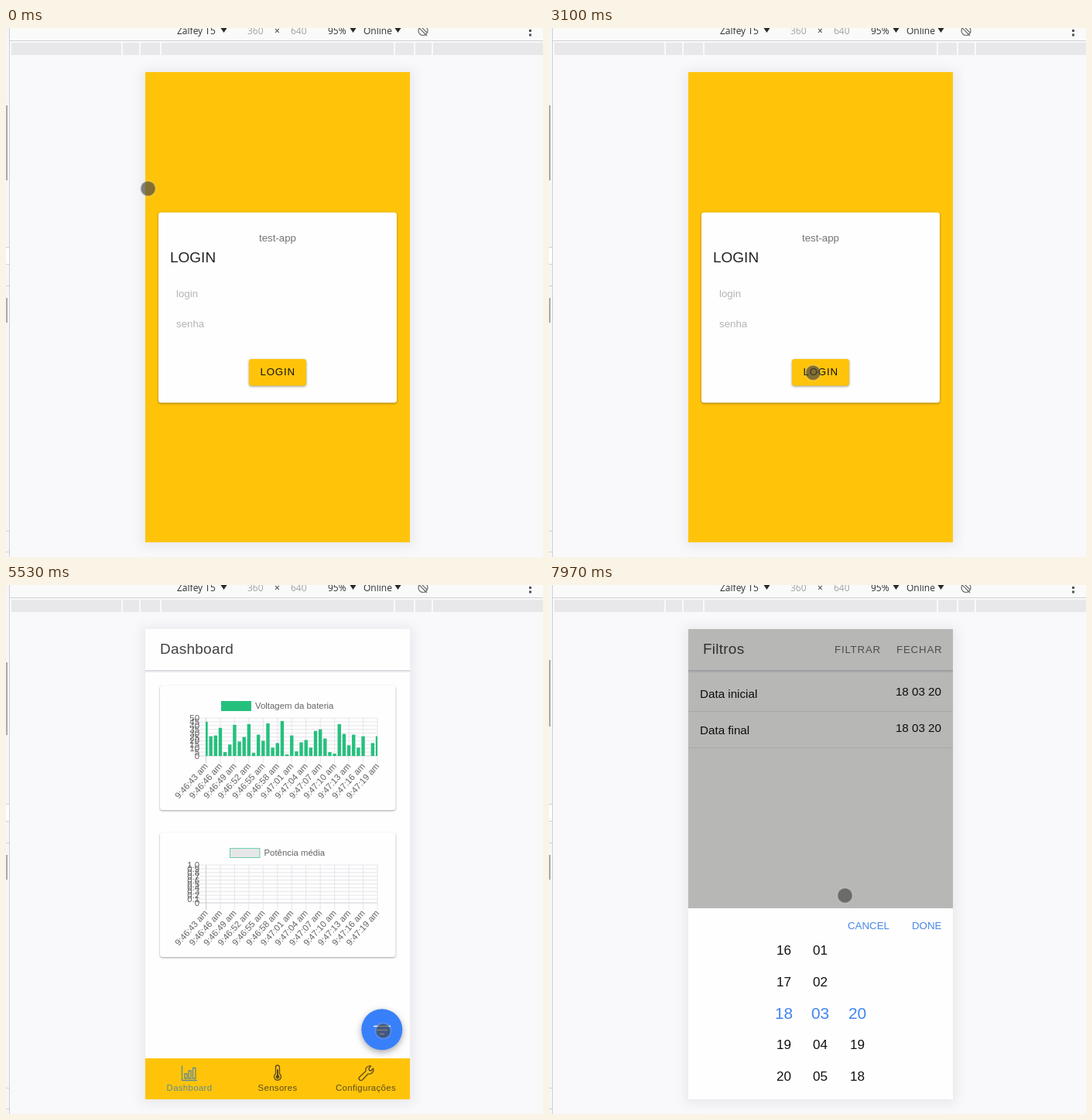
An HTML page for the animation above (8000 ms loop, 694x684 px).

```html
<!DOCTYPE html>
<html lang="pt">
<head>
<meta charset="utf-8">
<title>App demo</title>
<style>
html, body { margin: 0; width: 100%; height: 100%; overflow: hidden; background: #f9f9fb; }
svg { display: block; width: 100vw; height: 100vh; }
text { font-family: "Liberation Sans", Arial, sans-serif; white-space: pre; }
.bar text { font: 12px "Open Sans", "Noto Sans", sans-serif; fill: #303030; }
.bar .dim { fill: #a2a2a2; }
.title { font-size: 19px; letter-spacing: .24px; fill: #424242; }
.small { font-size: 13.3px; }
.caps { font-size: 13.3px; letter-spacing: .8px; }
.row { font-size: 15.2px; fill: #121212; }
.tick, .legend { font-size: 11.4px; fill: #636363; }
.tab { font-size: 11.4px; letter-spacing: .35px; text-anchor: middle; }
.mid { text-anchor: middle; }
.end { text-anchor: end; }
.icon { fill: none; stroke-width: 1.3; stroke-linejoin: round; stroke-linecap: round; }

.login-card { filter: drop-shadow(0 1.5px 1.5px rgba(60, 50, 20, .5)); }
.card { fill: #fefefe; filter: drop-shadow(0 1.2px 1.2px rgba(70, 70, 75, .5)); }
.fab { filter: drop-shadow(0 3px 4px rgba(60, 60, 70, .45)); }
.glow { filter: blur(7px); }

.anim { animation: 8s linear infinite; }
#home { animation-name: home; }
#bars { animation-name: grow; transform-origin: 0 221px; }
#shade { animation-name: shade; }
#modal { animation-name: rise, appear; }
#ripple { animation-name: ripple; transform-origin: 380px 144px; }
#dim { animation-name: dim; }
#picker { animation-name: picker; }
#cursor { animation-name: travel; }
#dot { animation-name: dot; animation-timing-function: step-end; }
#arrow { animation-name: arrow; animation-timing-function: step-end; }
#thumb { animation-name: thumb; animation-timing-function: step-end; }

@keyframes home {
  0%, 43.81% { opacity: 0; transform: translateY(38px); animation-timing-function: cubic-bezier(.36,.66,.04,1); }
  47.31%, 100% { opacity: 1; transform: none; }
}
@keyframes grow {
  0%, 41.81% { transform: scaleY(0); animation-timing-function: cubic-bezier(.165,.84,.44,1); }
  54.31%, 100% { transform: scaleY(1); }
}
@keyframes shade {
  0%, 73.8% { opacity: 0; }
  77.3%, 100% { opacity: .32; }
}
@keyframes rise {
  0%, 73.8% { transform: translateY(38px); animation-timing-function: cubic-bezier(.36,.66,.04,1); }
  77.3%, 100% { transform: none; }
}
@keyframes appear {
  0%, 73.8% { opacity: 0; animation-timing-function: ease-out; }
  75.7%, 100% { opacity: 1; }
}
@keyframes ripple {
  0%, 92.8% { opacity: 0; transform: scale(.1); animation-timing-function: ease-out; }
  93.2% { opacity: 1; transform: scale(.3); animation-timing-function: ease-out; }
  94.6%, 95.4% { opacity: 1; transform: scale(1); }
  97.4%, 100% { opacity: 0; transform: scale(1); }
}
@keyframes dim {
  0%, 95.6% { opacity: 0; }
  98.1%, 100% { opacity: .28; }
}
@keyframes picker {
  0%, 95.6% { transform: translateY(250px); animation-timing-function: cubic-bezier(.36,.66,.04,1); }
  98.1%, 100% { transform: none; }
}
@keyframes travel {
  0% { transform: translate(183.5px, 207.5px); }
  10.375%, 10.875% { transform: translate(186px, 281px); }
  15% { transform: translate(260px, 340px); }
  20.875% { transform: translate(335px, 440px); }
  23.125% { transform: translate(283px, 405px); }
  25% { transform: translate(313.5px, 357.5px); }
  26.875% { transform: translate(390px, 322px); }
  28.75% { transform: translate(467px, 420px); }
  30% { transform: translate(410px, 526px); }
  31.25% { transform: translate(358px, 501px); }
  33.125% { transform: translate(319px, 470px); }
  35.375%, 38.75% { transform: translate(342px, 446px); }
  41.875% { transform: translate(150px, 370px); }
  44.5%, 46.25% { transform: translate(128.5px, 332.5px); }
  48.75% { transform: translate(190px, 380px); }
  54.125% { transform: translate(308.5px, 459.5px); }
  56.875% { transform: translate(420px, 520px); }
  59.125%, 59.625% { transform: translate(488px, 566px); }
  61.25%, 64.125% { transform: translate(283px, 379px); }
  65.375% { transform: translate(211px, 326px); }
  67.875% { transform: translate(498px, 598px); }
  69.125%, 78.125% { transform: translate(487.5px, 576.5px); }
  81.25% { transform: translate(500px, 533px); }
  83.125% { transform: translate(269px, 340px); }
  85.375%, 95% { transform: translate(380.5px, 144.5px); }
  99.6%, 100% { transform: translate(382.5px, 401.5px); }
}
@keyframes dot { 0% { opacity: 1; } 41.4% { opacity: 0; } 48.3%, 100% { opacity: 1; } }
@keyframes arrow { 0% { opacity: 0; } 41.4% { opacity: 1; } 48.3%, 100% { opacity: 0; } }
@keyframes thumb {
  0% { height: 97px; transform: none; }
  40% { height: 94px; transform: none; }
  72% { height: 88px; transform: none; }
  98%, 100% { height: 86px; transform: translateY(-3px); }
}
</style>
</head>
<body>
<svg viewBox="0 0 694 684" preserveAspectRatio="xMinYMin meet">
  <defs>
    <clipPath id="screen"><rect x="180" y="57" width="342" height="608"/></clipPath>
    <clipPath id="plot"><rect x="258.5" y="165" width="221.5" height="56"/></clipPath>
    <clipPath id="rowclip"><rect x="191" y="117.5" width="328.5" height="46" rx="3"/></clipPath>
  </defs>

  <rect width="694" height="684" fill="#f9f9fb"/>
  <rect width="694" height="16" fill="#fafafb"/>
  <rect y="16" width="694" height="1" fill="#d2d2d4"/>
  <g fill="#e8e8eb" id="ruler"></g>

  <g class="bar">
    <text x="221" y="8">Zalfey T5</text>
    <text x="312" y="8" class="dim">360</text>
    <text x="347" y="8">×</text>
    <text x="368" y="8" class="dim">640</text>
    <text x="416" y="8">95%</text>
    <text x="462" y="8">Online</text>
    <path d="M277.5 0h8l-4 6zM444.5 0h8l-4 6zM502.5 0h8l-4 6z" fill="#2a2a2a"/>
    <g fill="none" stroke="#6a6a6a" stroke-width="1.2">
      <circle cx="539" cy="3.5" r="6"/><path d="M533-1l11 11M536-2l8 8"/>
    </g>
    <path d="M676 2h3v3h-3zM676 7.5h3v3h-3z" fill="#555"/>
  </g>

  <rect width="4" height="684" fill="#f6f6f8"/>
  <rect y="283" width="4" height="23" fill="#fefefe"/>
  <path d="M4.5 0V684M0 283.5h4M0 305.5h4M0 333.5h4M0 650.5h4M0 677.5h4" stroke="#d0d0d2" fill="none"/>
  <rect class="anim" id="thumb" y="100" width="2" height="97" fill="#ababab"/>
  <rect y="349" width="2" height="32" fill="#ababab"/>

  <rect class="glow" x="176" y="55" width="350" height="615" fill="#e2e2e7" opacity=".75"/>

  <g clip-path="url(#screen)">
    <rect x="180" y="57" width="342" height="608" fill="#ffc40a"/>
    <g class="login-card"><rect x="197" y="238.5" width="308" height="246" rx="3.5" fill="#fefefe"/></g>
    <text x="351" y="276" class="small mid" fill="#757575">test-app</text>
    <text x="212" y="303" font-size="19" fill="#222">LOGIN</text>
    <text x="220" y="348" class="small" fill="#b4b4b4">login</text>
    <text x="220" y="387" class="small" fill="#b4b4b4">senha</text>
    <g class="login-card"><rect x="314" y="428" width="74" height="34.5" rx="3.5" fill="#ffc40a"/></g>
    <text x="328.5" y="449" class="caps" fill="#111">LOGIN</text>

    <g class="anim" id="home">
      <rect x="180" y="57" width="342" height="608" fill="#fefefe"/>
      <rect x="180" y="110" width="342" height="1.5" fill="#d3d3d8"/>
      <rect x="180" y="111.5" width="342" height="1.5" fill="#ececf0"/>
      <text x="199" y="89" class="title">Dashboard</text>
      <rect class="card" x="199" y="130" width="304.5" height="161" rx="3.5"/>
      <rect class="card" x="199" y="320" width="304.5" height="161" rx="3.5"/>
      <rect x="278" y="150" width="39" height="13" fill="#26c07e"/>
      <text x="322" y="160" class="legend">Voltagem da bateria</text>
      <rect x="289.5" y="340.5" width="38.5" height="12" fill="#e6e6e8" stroke="#6fcfae"/>
      <text x="333.5" y="350" class="legend">Potência média</text>
      <g id="charts"></g>
      <g clip-path="url(#plot)"><g class="anim" id="bars" fill="#26c07e"></g></g>

      <circle class="fab" cx="485.8" cy="574.8" r="26.5" fill="#3880fa"/>
      <path d="M475 570.5h22M479 575.5h14M483 580.5h6" stroke="#f4f6fc" stroke-width="1.5"/>

      <rect x="180" y="612" width="342" height="53" fill="#ffc40a"/>
      <g class="icon" stroke="#5f8a98">
        <path d="M227.5 622v18.5h19M231 632h3v6h-3zM236 628h3v10h-3zM241.5 624.5h3.5v13.5h-3.5z"/>
      </g>
      <g class="icon" stroke="#5c4c20">
        <path d="M348.5 632v-8.5a2.5 2.5 0 0 1 5 0v8.5a4.5 4.5 0 1 1-5 0z"/>
        <path d="M351 627v8" stroke-width="2"/><circle cx="351" cy="636" r="1.8" fill="#5c4c20"/>
        <path d="M457 636l8-7.5a5.3 5.3 0 0 1 6.5-6.5l-2.5 3 .5 2.500 2.500.5 2.500-3a5.3 5.3 0 0 1-6.500 7l-7.500 8a2.5 2.5 0 0 1-3.500-4z"/>
      </g>
      <text x="237" y="654" class="tab" fill="#5f8a98">Dashboard</text>
      <text x="351" y="654" class="tab" fill="#5c4c20">Sensores</text>
      <text x="465" y="654" class="tab" fill="#5c4c20">Configurações</text>
    </g>

    <rect class="anim" id="shade" x="180" y="57" width="342" height="608"/>
    <g class="anim" id="modal">
      <rect x="180" y="57" width="342" height="608" fill="#fdfdfc"/>
      <rect x="180" y="110" width="342" height="1.5" fill="#d3d3d8"/>
      <rect x="180" y="111.5" width="342" height="1.5" fill="#ececf0"/>
      <text x="199" y="89" class="title">Filtros</text>
      <text x="369" y="88" class="caps" fill="#6a6a6a">FILTRAR</text>
      <text x="449" y="88" class="caps" fill="#6a6a6a">FECHAR</text>
      <path d="M180 163.5h342M180 210.5h342" stroke="#e8e8ea"/>
      <g clip-path="url(#rowclip)"><circle class="anim" id="ripple" cx="380" cy="144" r="192" fill="#cbcbcb"/></g>
      <text x="195" y="146" class="row">Data inicial</text>
      <text x="507" y="143" class="row end">18 03 20</text>
      <text x="195" y="192.5" class="row">Data final</text>
      <text x="507" y="190" class="row end">18 03 20</text>
    </g>

    <rect class="anim" id="dim" x="180" y="57" width="342" height="608"/>
    <g class="anim" id="picker">
      <rect x="180" y="418" width="342" height="247" fill="#fefefe"/>
      <text x="386" y="445" class="small" fill="#4888e8">CANCEL</text>
      <text x="469" y="445" class="small" fill="#4888e8">DONE</text>
    </g>
  </g>

  <g class="anim" id="cursor">
    <g class="anim" id="dot">
      <circle r="10.5" fill="#fff" opacity=".3"/>
      <circle r="9.5" fill="#111" opacity=".52"/>
    </g>
    <path class="anim" id="arrow" d="M0 0v21.500l5-4.500 3.500 8.500 4-1.800-3.500-8.200h7z" fill="#fefefe" stroke="#111" stroke-width="1.7" stroke-linejoin="round"/>
  </g>
</svg>
<script>
const NS = 'http://www.w3.org/2000/svg';
const $ = id => document.getElementById(id);

function add(parent, tag, attrs, label) {
  const el = document.createElementNS(NS, tag);
  for (const key in attrs) el.setAttribute(key, attrs[key]);
  if (label !== undefined) el.textContent = label;
  parent.append(el);
}

const marks = [7, 151, 174, 201, 503, 529, 552, 696];
marks.slice(1).forEach((next, i) =>
  add($('ruler'), 'rect', { x: marks[i], y: 19, width: next - marks[i] - 2, height: 16 }));

const left = 258.5, wide = 221.5, tall = 49;

function clock(sec) {
  const s = 43 + sec, min = 46 + Math.floor(s / 60);
  return `9:${min}:${String(s % 60).padStart(2, '0')} am`;
}

function chart(top, tickLabel) {
  const g = $('charts'), bottom = top + tall;
  for (let i = 0; i <= 10; i++) {
    const y = bottom - i * tall / 10;
    add(g, 'path', { d: `M249 ${y}H${left + wide}`, stroke: i ? '#e4e4e8' : '#c8c8d0', 'stroke-width': .9 });
    add(g, 'text', { x: 250, y: y + 4, class: 'tick end' }, tickLabel(i));
  }
  for (let k = 0; k <= 12; k++) {
    const x = left + k * wide / 12;
    add(g, 'path', { d: `M${x} ${top}V${bottom + 9.5}`, stroke: k ? '#e4e4e8' : '#c8c8d0', 'stroke-width': .9 });
    add(g, 'text', {
      y: 4, class: 'tick end', transform: `translate(${x} ${bottom + 11}) rotate(-48)`
    }, clock(k * 3));
  }
}
chart(172, i => i * 5);
chart(362, i => i ? (i / 10).toFixed(1) : '0');

const volts = [45, 26, 27, 37, 5, 15, 41, 19, 25, 42, 4, 28, 20, 43, 11, 17, 46, 2, 27,
  6, 18, 21, 11, 33, 35, 23, 5, 3, 42, 29, 14, 28, 11, 26, 0, 17, 26];
volts.forEach((v, i) => {
  const h = v * tall / 50;
  add($('bars'), 'rect', { x: left + i * wide / 36 - 2.2, y: 221 - h, width: 4.4, height: h });
});

const columns = [
  [303.5, ['16', '17', '18', '19', '20']],
  [350.5, ['01', '02', '03', '04', '05']],
  [398.5, ['', '', '20', '19', '18']]
];
columns.forEach(([x, items]) => items.forEach((item, i) => {
  const on = i === 2;
  add($('picker'), 'text', {
    x, y: 472 + i * 40.8 + (on ? 7.5 : 6), class: 'mid',
    'font-size': on ? 20.9 : 17.1, fill: on ? '#4285ee' : '#111'
  }, item);
}));
</script>
</body>
</html>
```
